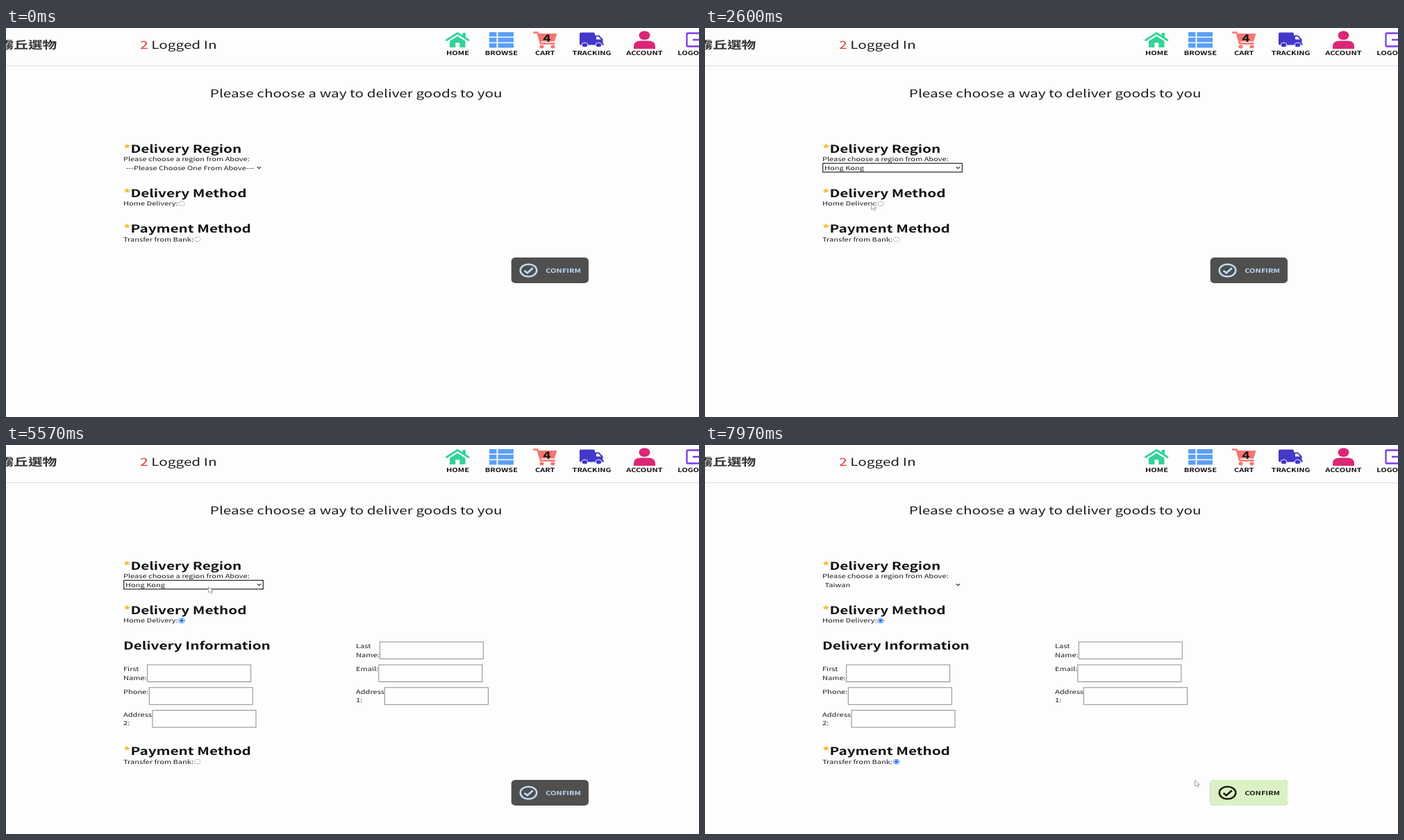
Recreate the animation shown at these times as an HTML page. Size 998 by 561 pixels, loop 8000 ms.

```html
<!DOCTYPE html>
<html lang="en">
<head>
<meta charset="utf-8">
<title>Delivery form</title>
<style>
html, body { margin: 0; width: 100%; height: 100%; overflow: hidden; background: #fdfdfd; }
svg { display: block; width: 998px; height: 561px; }
text {
  font: 16px "Noto Sans CJK TC", "Noto Sans CJK JP", "Noto Sans CJK", "Open Sans", sans-serif;
  fill: #1c1c1c; text-rendering: geometricPrecision;
}
.big { font-size: 30px; }
.bold { font-weight: 700; fill: #111; }
.star { fill: #f2b92e; }
.count { fill: #dc3535; }
.brand { fill: #333; }
.badge { font-size: 28px; }
.field { fill: #fefefe; stroke: #8b8b8f; stroke-width: 1; }
.ring { fill: #fff; stroke: #aaa; stroke-width: .8; }
.on .ring { stroke: #1a73f0; }
.dot { fill: #1a73f0; }
#confirm rect { fill: #4f4f4e; }
#confirm text { fill: #bfdcf5; }
#confirm .mark { fill: none; stroke: #bfdcf5; }
#confirm .hover rect { fill: #daf2c3; }
#confirm .hover text { fill: #1d1d14; }
#confirm .hover .mark { stroke: #1d1d14; }

/* hard state changes */
.step { animation: 8s step-end infinite; }
.prompt { animation-name: prompt; }
.first { animation-name: first; }
.second { animation-name: second; }
.focus { animation-name: focus; }
.details { animation-name: details; }
.lower { animation-name: lower; }
.paid { animation-name: paid; }
.hover { animation-name: hover; }
.arrow { animation-name: arrow; }
.beam { animation-name: beam; }
@keyframes prompt { 0% { opacity: 1 } 30%, 100% { opacity: 0 } }
@keyframes first { 0% { opacity: 0 } 30% { opacity: 1 } 72.5%, 100% { opacity: 0 } }
@keyframes second { 0% { opacity: 0 } 72.5%, 100% { opacity: 1 } }
@keyframes focus { 0% { opacity: 0 } 25% { opacity: 1 } 36.25% { opacity: 0 } 63.75% { opacity: 1 } 88.75%, 100% { opacity: 0 } }
@keyframes details { 0% { opacity: 0 } 36.25%, 100% { opacity: 1 } }
@keyframes lower { 0% { transform: translateY(0) } 36.25%, 100% { transform: translateY(152px) } }
@keyframes paid { 0% { opacity: 0 } 88.75%, 100% { opacity: 1 } }
@keyframes hover { 0% { opacity: 0 } 98.75%, 100% { opacity: 1 } }
@keyframes arrow {
  0% { opacity: 0 } 17.5% { opacity: 1 } 45% { opacity: 0 } 52% { opacity: 1 }
  78% { opacity: 0 } 80.2%, 100% { opacity: 1 }
}
@keyframes beam {
  0% { opacity: 0 } 45% { opacity: 1 } 52% { opacity: 0 }
  78% { opacity: 1 } 80.2%, 100% { opacity: 0 }
}

/* pointer path */
#pointer { animation: pointer 8s linear infinite; }
@keyframes pointer {
  0%, 17.5% { transform: translate(360px, 315px) }
  21.25% { transform: translate(301px, 225px) }
  25%, 27% { transform: translate(291px, 200px) }
  30% { transform: translate(250px, 222px) }
  32.5% { transform: translate(239px, 253px) }
  35%, 38% { transform: translate(252px, 253px) }
  47.5% { transform: translate(297px, 370px) }
  52% { transform: translate(301px, 345px) }
  59.625% { transform: translate(304px, 202px) }
  63%, 69% { transform: translate(292px, 201px) }
  72.5%, 76% { transform: translate(286px, 216px) }
  79.125% { transform: translate(290px, 238px) }
  87.5%, 91.5% { transform: translate(276px, 456px) }
  99.6%, 100% { transform: translate(705px, 483px) }
}
</style>
</head>
<body>
<svg id="stage" viewBox="0 0 998 561">
  <rect width="998" height="561" fill="#fdfdfd"/>
  <path d="M0 54.5H998" stroke="#d9d9e6" stroke-width="1.2"/>

  <g id="header">
    <g fill="#34d399">
      <path d="M634.5 17.5L650.3 7.5L666 17.5" fill="none" stroke="#34d399" stroke-width="2.8" stroke-linecap="round" stroke-linejoin="round"/>
      <path d="M657.5 7H662V14.5L657.5 11.5ZM639 18.8L650.3 11.7L661.5 18.8V28H653.3V21.2H647.3V28H639Z"/>
    </g>
    <path fill="#5b9ff5" d="M696 6h10.5v6.5h-10.5zm12.5 0h22.5v6.5h-22.5zM696 14h10.5v6.5h-10.5zm12.5 0h22.5v6.5h-22.5zM696 22h10.5v6.5h-10.5zm12.5 0h22.5v6.5h-22.5z"/>
    <g fill="#f57672">
      <path d="M760 6.5H765.5L770 22.5H790" fill="none" stroke="#f57672" stroke-width="2.4" stroke-linecap="round" stroke-linejoin="round"/>
      <path d="M766 8H793.5L790 19.5H769Z"/>
      <ellipse cx="771.5" cy="27" rx="3.2" ry="2.4"/><ellipse cx="787.5" cy="27" rx="3.2" ry="2.4"/>
    </g>
    <g fill="#4338ca">
      <rect x="826" y="6.5" width="22" height="18" rx="1.8"/>
      <path d="M847 10.5H854L859.5 16V22.5H861V24.5H847Z"/>
      <path d="M850 12.5H853.3L857 16.5H850Z" fill="#fdfdfd"/>
      <g stroke="#fdfdfd" stroke-width="1"><ellipse cx="833.5" cy="24.5" rx="4.2" ry="3.3"/><ellipse cx="853.5" cy="24.5" rx="4.2" ry="3.3"/></g>
    </g>
    <g fill="#db2777">
      <ellipse cx="919.5" cy="10.6" rx="8" ry="6.4"/>
      <path d="M904 30V26.5Q904 18.5 914 18.5H925Q935 18.5 935 26.5V30Z"/>
    </g>
    <path d="M1004 7.5H982Q980.5 7.5 980.5 9V25Q980.5 26.5 982 26.5H1004M989 17H1004" fill="none" stroke="#7c3aed" stroke-width="2.3"/>
  </g>

  <g id="region">
    <rect class="step focus" x="169.7" y="195.2" width="200.6" height="12.6" fill="#fff" stroke="#222" stroke-width="1.2"/>
    <path d="M361.8 200.3L364.5 202.7L367.2 200.3" fill="none" stroke="#333" stroke-width="1.2"/>
    <g id="prompt" class="step prompt"></g>
    <g id="first" class="step first"></g>
    <g id="second" class="step second"></g>
  </g>
  <g id="method"></g>
  <g id="details" class="step details"></g>
  <g id="lower" class="step lower">
    <g id="payment"></g>
    <g id="confirm"></g>
  </g>

  <g id="pointer">
    <path class="step arrow" d="M.5 .5V9L2.8 7.3L4.4 10.2L6 9.6L4.5 6.8H7.6Z" fill="#fff" stroke="#93939b" stroke-width=".9"/>
    <path class="step beam" d="M-3 -3.8H-1Q0 -3.8 0 -3Q0 -3.8 1 -3.8H3M0 -3V3.5M-3 4.2H-1Q0 4.2 0 3.5Q0 4.2 1 4.2H3" fill="none" stroke="#444" stroke-width="1"/>
  </g>
</svg>
<script>
const byId = id => document.getElementById(id);
const add = (id, markup) => byId(id).insertAdjacentHTML('beforeend', markup);

// The whole page is shown with one uniform wide aspect.
const text = (x, y, content, cls = '', anchor = 'start') =>
  `<text transform="translate(${x} ${y}) scale(.69 .52)" class="${cls}" text-anchor="${anchor}">${content}</text>`;
const heading = (y, title) =>
  text(169, y, `<tspan class="star">*</tspan>${title}`, 'big bold');
const radio = (x, y) => `<ellipse class="ring" cx="${x}" cy="${y}" rx="4.2" ry="3.2"/>`;
const checked = (x, y, cls) =>
  `<g class="step on ${cls}">${radio(x, y)}<ellipse class="dot" cx="${x}" cy="${y}" rx="2.7" ry="2.1"/></g>`;
const field = (x, y, boxX, ...lines) =>
  lines.map((line, i) => text(x, y + 9.2 + i * 12.4, line)).join('') +
  `<rect class="field" x="${boxX}" y="${y}" width="149" height="24.5"/>`;
const button = cls => `<g class="${cls}">
  <rect x="727.7" y="331" width="111.3" height="37" rx="6" ry="5"/>
  <ellipse class="mark" cx="752.5" cy="349.6" rx="11.8" ry="8.9" stroke-width="2.5"/>
  <path class="mark" d="M746.5 350L750.8 353.3L758.8 346.3" stroke-width="2.7"/>
  ${text(777.3, 353, 'CONFIRM', 'bold')}</g>`;

add('header',
  text(-9.5, 30, '霧丘選物', 'big bold brand') +
  text(193.2, 30, '<tspan class="count">2</tspan> Logged In', 'big') +
  text(779, 20, '4', 'bold badge', 'middle') +
  [['HOME', 650.5], ['BROWSE', 713.4], ['CART', 776.2], ['TRACKING', 843.5], ['ACCOUNT', 919.5]]
    .map(([label, x]) => text(x, 39.2, label, 'bold', 'middle')).join('') +
  text(967.2, 39.2, 'LOGOUT', 'bold') +
  text(504.2, 99.8, 'Please choose a way to deliver goods to you', 'big', 'middle'));

add('region', heading(179.8, 'Delivery Region') +
  text(169, 192.2, 'Please choose a region from Above:'));
add('prompt', text(172.5, 204.9, '---Please Choose One From Above---'));
add('first', text(172, 204.9, 'Hong Kong'));
add('second', text(172.5, 204.9, 'Taiwan'));

add('method', heading(243.9, 'Delivery Method') +
  text(169, 256.4, 'Home Delivery:') + radio(253, 253.3) + checked(253, 253.3, 'details'));

add('details', text(169, 295.4, 'Delivery Information', 'big bold') +
  field(504, 284, 538.3, 'Last', 'Name:') +
  field(169, 317, 203.6, 'First', 'Name:') +
  field(504, 317, 536.8, 'Email:') +
  field(169, 349.8, 206.3, 'Phone:') +
  field(504, 349.8, 545.4, 'Address', '1:') +
  field(169, 382.6, 211, 'Address', '2:'));

add('payment', heading(295.4, 'Payment Method') +
  text(169, 307.7, 'Transfer from Bank:') + radio(275.7, 304.7) + checked(275.7, 304.7, 'paid'));
add('confirm', button('') + button('step hover'));
</script>
</body>
</html>
```
